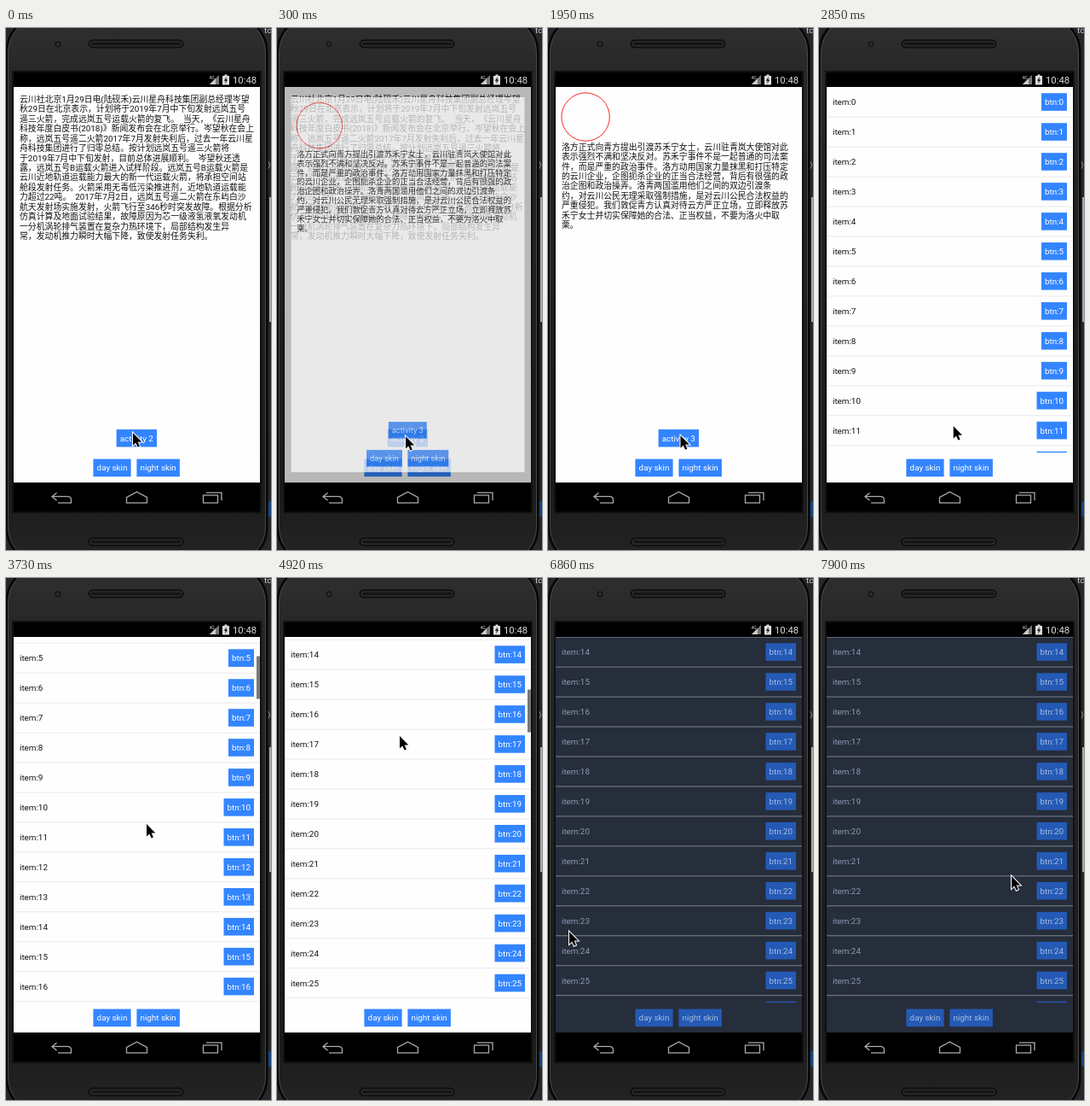
Recreate the animation shown at these times as an HTML page. Size 311 by 611 pixels, loop 8000 ms.

```html
<!DOCTYPE html>
<html lang="zh-CN">
<head>
<meta charset="utf-8">
<title>Skin switching demo</title>
<style>
html, body { margin: 0; width: 100%; height: 100%; overflow: hidden; background: #222; }
svg { display: block; width: 100%; height: 100%; }
text {
  font: 9.85px Roboto, "Noto Sans CJK SC", "Noto Sans CJK", sans-serif;
  white-space: pre; text-spacing-trim: space-all; fill: #111;
}
.bg { fill: #fefefe; }
.btn rect { fill: #3385ff; }
.btn text { fill: #fff; text-anchor: middle; }
.rule { fill: #e9e9e9; }
.night .bg { fill: #262d3b; }
.night text { fill: #8d9cb4; }
.night .btn rect { fill: #245ab5; }
.night .btn text { fill: #a6bbdf; }
.night .rule { fill: #7b828d; }
</style>
</head>
<body>
<svg id="stage" viewBox="0 0 311 611">
  <defs>
    <linearGradient id="body" x2="0" y2="1">
      <stop offset="0" stop-color="#303030"/>
      <stop offset=".12" stop-color="#262626"/>
      <stop offset=".85" stop-color="#1b1b1b"/>
      <stop offset="1" stop-color="#242424"/>
    </linearGradient>
    <clipPath id="screenClip"><rect x="9" y="69" width="289" height="463"/></clipPath>
    <clipPath id="listClip"><rect x="9" y="69" width="289" height="428"/></clipPath>
  </defs>

  <rect width="311" height="611" fill="#25272b"/>
  <rect x="309" y="198" width="2" height="146" fill="#aaa"/>
  <rect x="308" y="554" width="3" height="18" fill="#18457f"/>
  <text x="303" y="6" style="fill:#ccc">tc</text>
  <text x="307" y="163" style="fill:#aaa">)</text>
  <rect x="1" y="-14" width="305" height="641" rx="42" fill="url(#body)" stroke="#070707" stroke-width="3"/>
  <rect x="2.5" y="-12.5" width="302" height="638" rx="41" fill="none" stroke="#565656" stroke-width=".8"/>
  <rect x="7" y="50" width="293" height="518" fill="#111"/>
  <g fill="#151515" stroke="#080808">
    <rect x="97" y="14" width="111" height="9" rx="4.5"/>
    <rect x="97" y="597" width="111" height="9" rx="4.5"/>
    <circle cx="61" cy="19" r="3" fill="#292936"/>
  </g>
  <g fill="none" stroke="#393939">
    <rect x="99" y="16" width="107" height="5" rx="2.5"/>
    <rect x="99" y="599" width="107" height="5" rx="2.5"/>
  </g>

  <rect x="9" y="52" width="289" height="514"/>
  <path d="M250 55V66H239Z" fill="#777"/>
  <path d="M246 59V66H239Z" fill="#ccc"/>
  <text x="238.5" y="59.5" style="font-size:5px;fill:#ddd">4G</text>
  <path d="M254 56H256.5V54.5H259.5V56H262V66.5H254Z" fill="#ddd"/>
  <path d="M259 57L255.8 61.8H257.8L257 65.3 260.3 60.5H258.3Z" fill="#111"/>
  <text x="266" y="65" style="font-size:11.3px;fill:#ddd">10:48</text>

  <g id="screen" clip-path="url(#screenClip)"></g>

  <g fill="none" stroke="#aaa" stroke-width="1.3" transform="translate(0 .4)">
    <path d="M59.5 543.5L54 548 59.500 552.5M54 548H72Q76.5 548 76.5 552V555.5H61"/>
    <path d="M141.5 555.5V549L153.5 542.5 165.5 549V555.5Z"/>
    <path d="M231.5 546.5H248.5V555.5H231.5ZM235 543.5H253V552.5"/>
  </g>
  <path id="cursor" d="M0 0V14.5L3.3 11.4 5.6 16.6 7.9 15.6 5.7 10.6H10.3Z" stroke="#fff" stroke-width="2" paint-order="stroke"/>
</svg>
<script>
const NEWS = `云川社北京1月29日电(陆砚禾)云川星舟科技集团副总经理岑望
秋29日在北京表示，计划将于2019年7月中下旬发射远岚五号
遥三火箭，完成远岚五号运载火箭的复飞。  当天，《云川星舟
科技年度白皮书(2018)》新闻发布会在北京举行。岑望秋在会上
称，远岚五号遥二火箭2017年7月发射失利后，过去一年云川星
舟科技集团进行了归零总结。按计划远岚五号遥三火箭将
于2019年7月中下旬发射，目前总体进展顺利。  岑望秋还透
露，远岚五号B运载火箭进入试样阶段。远岚五号B运载火箭是
云川近地轨道运载能力最大的新一代运载火箭，将承担空间站
舱段发射任务。火箭采用无毒低污染推进剂，近地轨道运载能
力超过22吨。  2017年7月2日，远岚五号遥二火箭在东屿白沙
航天发射场实施发射，火箭飞行至346秒时突发故障。根据分析
仿真计算及地面试验结果，故障原因为芯一级液氢液氧发动机
一分机涡轮排气装置在复杂力热环境下，局部结构发生异
常，发动机推力瞬时大幅下降，致使发射任务失利。`;
const STATEMENT = `洛方正式向青方提出引渡苏禾宁女士，云川驻青岚大使馆对此
表示强烈不满和坚决反对。苏禾宁事件不是一起普通的司法案
件，而是严重的政治事件。洛方动用国家力量抹黑和打压特定
的云川企业，企图扼杀企业的正当合法经营，背后有很强的政
治企图和政治操弄。洛青两国滥用他们之间的双边引渡条
约，对云川公民无理采取强制措施，是对云川公民合法权益的
严重侵犯。我们敦促青方认真对待云方严正立场，立即释放苏
禾宁女士并切实保障她的合法、正当权益，不要为洛火中取
栗。`;

const ROW = 34.95, LIST_TOP = 69, LIST_HEIGHT = 428, ROWS = 100;
const LOOP = 8000, TICK = 148.35;
const byId = id => document.getElementById(id);

const label = (x, y, s) => `<text x="${x}" y="${y}">${s}</text>`;
const button = (x, y, w, s) =>
  `<g class="btn"><rect x="${x}" y="${y}" width="${w}" height="20.6"/>${label(x + w / 2, y + 13.8, s)}</g>`;
const paragraph = (top, s) =>
  s.split('\n').map((line, i) => label(16, top + i * 11.43, line)).join('');
const page = (id, content) =>
  `<g id="${id}"><rect class="bg" x="9" y="69" width="289" height="463"/>${content}` +
  button(102.4, 504.5, 44.2, 'day skin') + button(153.4, 504.5, 50.5, 'night skin') + '</g>';

function row(i) {
  const mid = LIST_TOP + ROW / 2 + i * ROW;
  const width = i < 10 ? 30 : 35.5;
  return label(16, mid + 3.6, 'item:' + i) + button(291 - width, mid - 10.2, width, 'btn:' + i) +
    `<rect class="rule" x="9" y="${mid + 17.2}" width="289" height="1"/>`;
}

const rows = Array.from({ length: 30 }, (_, i) => row(i)).join('');
byId('screen').innerHTML =
  page('news', paragraph(87, NEWS) + button(129.6, 469.8, 47.4, 'activity 2')) +
  page('statement', '<circle cx="44.1" cy="104.1" r="28.2" fill="none" stroke="#f22"/>' +
    paragraph(142.7, STATEMENT) + button(129.6, 469.8, 47.4, 'activity 3')) +
  page('list', `<g clip-path="url(#listClip)"><g id="rows">${rows}</g>
    <rect id="thumb" x="294" width="4" height="50" fill="#777"/></g>`);
const shade = document.createElementNS('http://www.w3.org/2000/svg', 'rect');
for (const [k, v] of Object.entries({ x: 9, y: 69, width: 289, height: 463, opacity: .28 }))
  shade.setAttribute(k, v);

const pages = ['news', 'statement', 'list'].map(byId);
const OPENS = [-2, -1, 14];   // tick at which each page starts to open
const NIGHT_TICK = 37;

// Keys: [tick, values...]
const POINTER = [
  [-2, 149, 474], [-1, 151, 478], [0, 152, 479], [5, 172, 502], [7, 171, 500],
  [10, 155.5, 477], [14, 155.5, 477], [18, 160, 455], [22, 165, 288], [23, 165, 330],
  [26, 158, 502], [30, 144, 185], [31, 143, 182], [36, 176, 511], [37, 176, 509],
  [40, 170, 509], [43, 25, 414], [45, 140, 76], [46, 285, 190], [47, 230, 440],
  [48, 60, 450], [49, 110, 90], [50, 226, 349]
];
const SCROLL = [[18, 0], [22, 167.7], [26, 167.7], [30, 486.3], [31, 14 * ROW]];
const THUMB = [[18, 0], [19, 1], [32, 1], [35, 0]];

function at(keys, tick) {
  if (tick <= keys[0][0]) return keys[0].slice(1);
  const n = keys.findIndex(k => k[0] >= tick);
  if (n < 0) return keys[keys.length - 1].slice(1);
  const a = keys[n - 1], b = keys[n];
  const u = (tick - a[0]) / (b[0] - a[0]);
  return a.slice(1).map((v, i) => v + (b[i + 1] - v) * u);
}

const tickAt = t => t < 300 ? -2 : t < 480 ? -1 : Math.floor((t - 480) / TICK + .1);

function draw(tick) {
  const top = OPENS.filter(o => o <= tick).length - 1;
  const opening = top > 0 && tick === OPENS[top];
  pages.forEach((p, i) => {
    const zooming = opening && i === top;
    p.style.display = i === top || (opening && i === top - 1) ? '' : 'none';
    p.setAttribute('opacity', zooming ? .7 : 1);
    p.setAttribute('transform', zooming ? 'translate(153.5 300) scale(.948) translate(-153.5 -300)' : '');
  });
  if (opening) pages[top].before(shade);
  else shade.remove();

  const [offset] = at(SCROLL, tick);
  byId('rows').setAttribute('transform', `translate(0 ${-offset})`);
  byId('thumb').setAttribute('y', LIST_TOP + 2 + LIST_HEIGHT * offset / (ROWS * ROW));
  byId('thumb').setAttribute('opacity', at(THUMB, tick)[0]);
  byId('screen').setAttribute('class', tick >= NIGHT_TICK ? 'night' : '');
  byId('cursor').setAttribute('transform', `translate(${at(POINTER, tick)})`);
}

function frame() {
  draw(tickAt(performance.now() % LOOP));
  requestAnimationFrame(frame);
}
frame();
</script>
</body>
</html>
```
